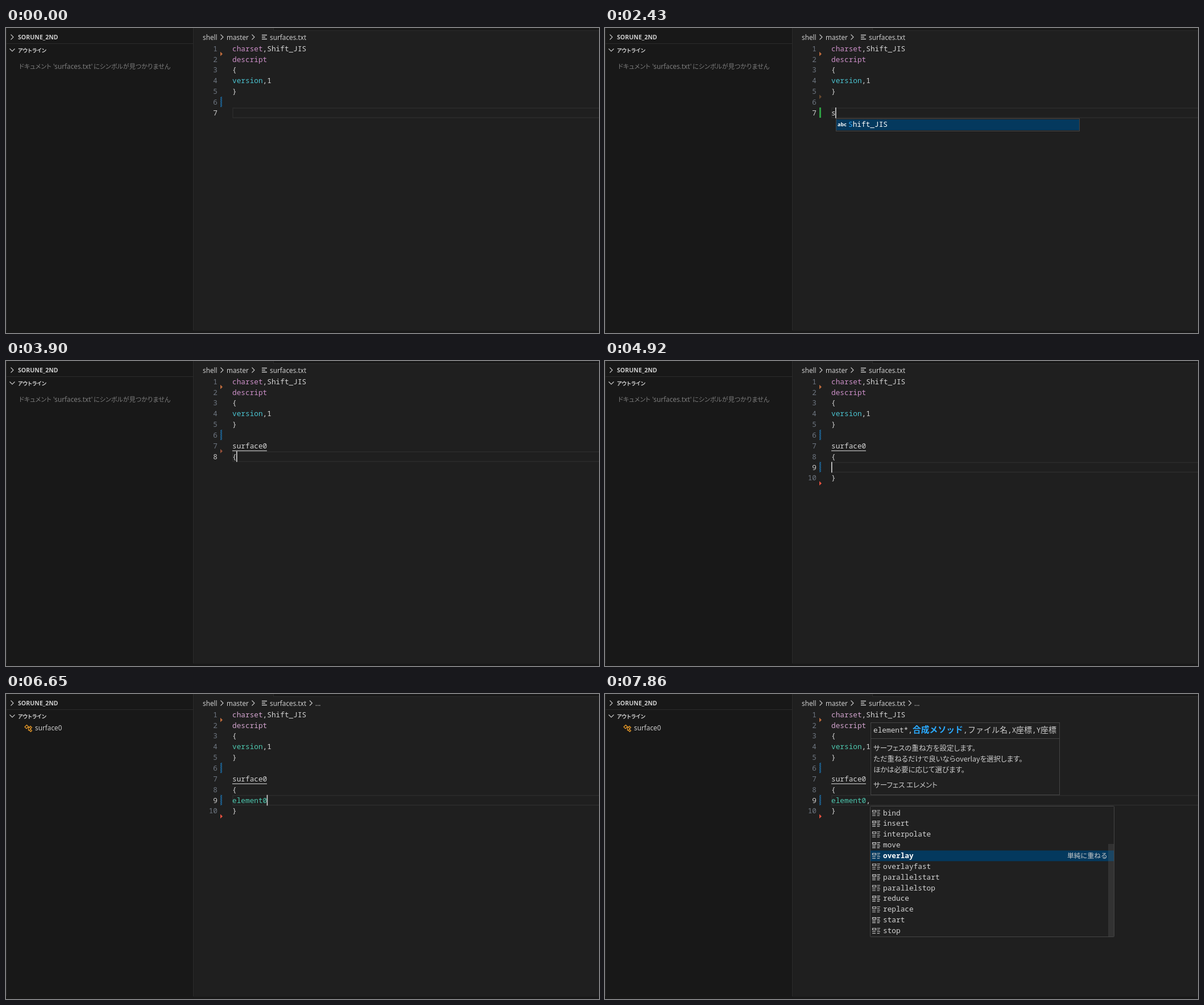
These frames come from a looping animation (1043x537 px, 7990 ms). An HTML page:

```html
<!DOCTYPE html>
<html lang="ja">
<head>
<meta charset="utf-8">
<title>Editor</title>
<style>
  html, body { margin: 0; width: 100%; height: 100%; overflow: hidden; background: #1f1f1f; }
  svg { display: block; }
  text { fill: #ccc; white-space: pre; }
  .mono { font: 12.77px "Noto Sans Mono", "DejaVu Sans Mono", monospace; }
  .mono, .mono text { fill: #d4d4d4; }
  .ui { font: 11.75px "Noto Sans", "Open Sans", sans-serif; }
  .head { font: bold 10.6px "Noto Sans", "Open Sans", sans-serif; }
  .jp { font: 12.5px "Noto Sans CJK JP", "Noto Sans CJK", sans-serif; font-feature-settings: "palt"; }
  .full { font-feature-settings: normal; }
  .bold { font-weight: bold; }
  .mono .num { fill: #6e7681; text-anchor: end; }
  .mono .num.active { fill: #ccc; }
  .mono .key { fill: #cc8fc8; }
  .mono .type { fill: #4bc3d0; }
  .late .mono .key { fill: #d2a4ce; }
  .late .mono .type { fill: #4ec9b0; }
  .mono .picked { fill: #fff; font-weight: bold; }
  .dim { fill: #7c7c7c; }
  .blue { fill: #2aaaff; }
  .line { fill: none; stroke: #ccc; stroke-width: 1.1; }
  .box { fill: #202020; stroke: #454545; }
</style>
</head>
<body>
<svg id="stage" width="1043" height="537" viewBox="0 0 1043 537">
  <defs>
    <pattern id="hatch" width="3" height="3" patternUnits="userSpaceOnUse">
      <path d="M-1 1L1 -1M0 3L3 0M2 4L4 2" stroke="#1b81c8" stroke-width="1.2"/>
    </pattern>
    <g id="chev"><path class="line" d="M-2.5 -4.5L2 0L-2.5 4.5"/></g>
    <g id="member" class="line">
      <path d="M.5 -4.5H6.5V-1.5H.5ZM8.5 -4.5H14M8.5 -1.5H13M0 1.5H6M8.5 1.5H14M0 4.5H6M8.5 4.5H13"/>
    </g>
  </defs>

  <!-- window chrome -->
  <rect width="329" height="537" fill="#181818"/>
  <rect x="470" width="573" height="4" fill="#181818"/>
  <path d="M.5 0V532M329.5 0V532M0 27.5H329M470 4.5H1043M470.5 0V4" stroke="#2b2b2b"/>
  <rect y="533" width="1043" height="4" fill="#181818"/>

  <!-- sidebar -->
  <use href="#chev" x="11" y="16"/>
  <text class="head" x="21" y="20">SORUNE_2ND</text>
  <use href="#chev" transform="translate(11 39) rotate(90)"/>
  <text class="jp bold" x="21" y="42.5" style="font-size:9.2px">アウトライン</text>
  <g data-on="0 6650">
    <text class="jp dim" x="23" y="72" style="font-size:11.1px">ドキュメント</text>
    <text class="ui dim" x="83" y="72">'surfaces.txt'</text>
    <text class="jp dim" x="154" y="72" style="font-size:11.1px">にシンボルが見つかりません</text>
  </g>
  <g data-on="6650 7990">
    <path d="M33 58L36.5 54.5L39.5 57.5L36 61ZM38 58.5H41M39.5 58.5V64H41M41 58.5L43 56.5L45.5 59L43.5 61ZM41 64L43 62L45.5 64.5L43.5 66.5Z"
      fill="none" stroke="#ee9d28" stroke-width="1.2"/>
    <text class="ui" x="51" y="64">surface0</text>
  </g>

  <!-- breadcrumbs -->
  <g class="ui">
    <text x="346" y="20.5">shell</text>
    <use href="#chev" x="380" y="16"/>
    <text x="388" y="20.5">master</text>
    <use href="#chev" x="435" y="16"/>
    <path class="line" d="M450 12.5H459M450 16H456M450 19.5H459" style="stroke-width:1.4"/>
    <text x="464" y="20.5">surfaces.txt</text>
    <g data-on="6650 7990">
      <use href="#chev" x="536.5" y="16"/>
      <text x="544" y="20.5">...</text>
    </g>
  </g>

  <!-- editor -->
  <rect id="current" x="399" width="660" height="17" fill="none" stroke="#2b2b2b" stroke-width="1.7"/>
  <g id="marks"></g>
  <g id="code" class="mono"></g>
  <rect data-on="3440 3630 3900 4050 4250 4450 4720 7990" x="398" y="157.5" width="61" height="1.1" fill="#d4d4d4"/>
  <rect id="caret" width="1.6" height="18.8" fill="#d8d8d8"/>

  <!-- word suggestion -->
  <g data-on="2430 2510">
    <rect class="box" x="406.5" y="159.5" width="428" height="22"/>
    <rect x="407" y="161" width="427" height="19" fill="#04395e"/>
    <text class="ui" x="409" y="173" style="font-size:9px;font-weight:600;fill:#fff">abc</text>
    <text class="mono" x="428" y="174" style="fill:#fff;font-weight:500"><tspan class="blue">S</tspan>hift_JIS</text>
  </g>

  <!-- method suggestions -->
  <g data-on="6980 7990">
    <rect class="box" x="466.5" y="197.5" width="429" height="230" rx="1"/>
    <rect x="467" y="275.5" width="428" height="18.8" fill="#04395e"/>
    <g id="list" class="mono"></g>
    <text class="jp full" x="813" y="289" style="font-size:11.8px">単純に重ねる</text>
    <rect id="bar" x="885" y="264" width="10" height="163" fill="#797979"/>
  </g>

  <!-- parameter hint -->
  <g data-on="7120 7990">
    <rect class="box" x="467.5" y="50.5" width="332" height="127"/>
    <path d="M468 78.5H799" stroke="#454545"/>
    <text class="mono" x="472" y="67.5">element*,</text>
    <text class="jp full bold blue" x="541" y="68" style="font-size:14.8px">合成メソッド</text>
    <g id="params"></g>
    <g class="jp">
      <text x="472" y="100">サーフェスの重ね方を設定します。</text>
      <text x="472" y="119">ただ重ねるだけで良いならoverlayを選択します。</text>
      <text x="472" y="137.5">ほかは必要に応じて選びます。</text>
      <text x="472" y="164.5">サーフェス エレメント</text>
    </g>
  </g>
</svg>
<script>
const LOOP = 7990, LEFT = 398, CHAR = 7.66, ROW = 18.86;
const $ = id => document.getElementById(id);
const rowTop = line => 26.8 + (line - 1) * ROW;
const baseline = line => rowTop(line) + 13.9;

function add(parent, tag, attrs, text = '') {
  const el = document.createElementNS('http://www.w3.org/2000/svg', tag);
  for (const k in attrs) el.setAttribute(k, attrs[k]);
  el.textContent = text;
  return parent.appendChild(el);
}

function addCode(line, col, text, cls = '', on = `0 ${LOOP}`) {
  return add($('code'), 'text', { x: LEFT + col * CHAR, y: baseline(line), class: cls, 'data-on': on }, text);
}

addCode(1, 0, 'charset', 'key');
addCode(1, 7, ',Shift_JIS');
addCode(2, 0, 'descript', 'key');
addCode(3, 0, '{');
addCode(4, 0, 'version', 'type');
addCode(4, 7, ',1');
addCode(5, 0, '}');
addCode(8, 0, '{', '', '3900 7990');
addCode(9, 0, '}', '', '4250 4720');
addCode(10, 0, '}', '', '4720 7990');

// typed text: one time per character
const surface = { el: addCode(7, 0, ''), text: 'surface0', times: [2230, 2510, 2640, 2840, 3040, 3240, 3340, 3440] };
const element = { el: addCode(9, 0, ''), text: 'element0', times: [5250, 5400, 5530, 5660, 5780, 5910, 6050, 6580] };
const comma = { el: addCode(9, 8, ''), text: ',', times: [6980] };

const born = { 8: 3630, 9: 4050, 10: 4720 };
const numbers = [];
for (let n = 1; n <= 10; n++) {
  const attrs = { x: 372, y: baseline(n), class: 'num', 'data-on': `${born[n] || 0} ${LOOP}` };
  numbers.push(add($('code'), 'text', attrs, n));
}

// gutter change marks
function strip(line, fill, on) {
  add($('marks'), 'rect', { x: 377, y: rowTop(line), width: 3, height: ROW - .8, fill, 'data-on': on });
}
function wedge(line, fill, on) {
  const y = rowTop(line + 1);
  add($('marks'), 'path', { d: `M377 ${y - 3.8}L381 ${y}L377 ${y + 3.8}Z`, fill, 'data-on': on });
}
wedge(1, '#bd6b3d', '0 7990');
strip(6, 'url(#hatch)', '0 2300 3700 7990');
wedge(5, '#69492f', '2300 3700');
strip(7, '#2ea043', '2300 3700');
wedge(8, '#a34f3c', '3700 3900 4250 4450 4720 4920');
wedge(7, '#95503a', '3900 4250');
wedge(9, '#d9503f', '4450 4720');
wedge(10, '#e5503f', '4720 7990');
strip(9, 'url(#hatch)', '4920 7990');

'bind insert interpolate move overlay overlayfast parallelstart parallelstop reduce replace start stop'
  .split(' ').forEach((name, i) => {
    const y = 209.5 + i * ROW;
    add($('list'), 'use', { href: '#member', x: 470, y });
    add($('list'), 'text', { x: 489, y: y + 4, class: name === 'overlay' ? 'picked' : '' }, name);
  });

[[630, ','], [638, 'ファイル名'], [708, ',X'], [723, '座標'], [751, ',Y'], [766, '座標']].forEach(([x, s]) => {
  const wide = s[0] !== ',';
  add($('params'), 'text', {
    x, y: wide ? 68 : 67.5, class: wide ? 'jp full' : 'mono', style: wide ? 'font-size:14px' : ''
  }, s);
});

// pairs of on/off times
const timed = [...document.querySelectorAll('[data-on]')].map(el => ({ el, on: el.dataset.on.split(' ').map(Number) }));
const count = (times, t) => times.filter(x => x <= t).length;
const isOn = (on, t) => count(on, t) % 2 === 1;
const last = (steps, t) => steps.filter(s => s[0] <= t).pop();

// time, line, column
const moves = [[0, 7, 0], [3630, 8, 0], [3900, 8, 1], [4050, 9, 0], [4250, 9, 1], [4450, 8, 1], [4720, 9, 0]];
const blink = [1190, 1640, 2100, 7450];
const fade = [[0, 0], [7050, .4], [7520, .365], [7860, .2]];

function draw(t) {
  for (const { el, on } of timed) el.style.display = isOn(on, t) ? '' : 'none';
  for (const w of [surface, element, comma]) w.el.textContent = w.text.slice(0, count(w.times, t));
  element.el.classList.toggle('type', t >= 6650);
  $('stage').classList.toggle('late', t >= 6650);

  let [, line, col] = last(moves, t);
  if (line === 7) col = count(surface.times, t);
  if (line === 9 && t >= 4720) col = count(element.times, t) + count(comma.times, t);
  numbers.forEach((el, i) => el.classList.toggle('active', i + 1 === line));
  $('current').setAttribute('y', rowTop(line) + 1);
  $('caret').setAttribute('x', LEFT + col * CHAR - (col ? .6 : 0));
  $('caret').setAttribute('y', rowTop(line));
  $('caret').style.display = isOn(blink, t) ? '' : 'none';
  $('bar').setAttribute('opacity', last(fade, t)[1]);
}

const began = performance.now();
function tick() {
  draw((performance.now() - began) % LOOP);
  requestAnimationFrame(tick);
}
tick();
</script>
</body>
</html>
```
